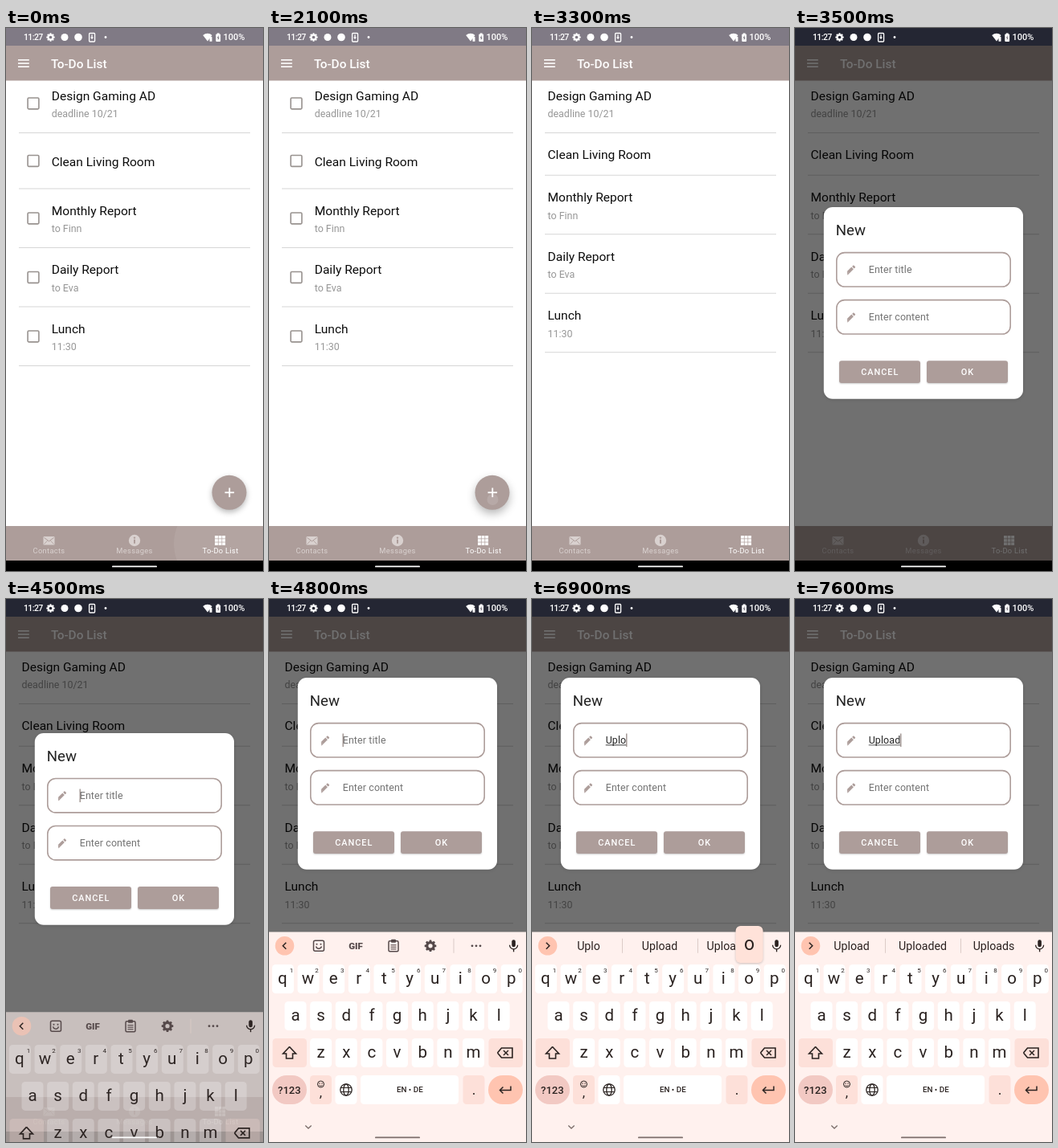
An HTML page with a canvas that plays this animation: 320 by 676 pixels, repeating every 8 s.

```html
<!DOCTYPE html>
<html lang="en">
<head>
<meta charset="utf-8">
<title>To-Do List</title>
<style>
html, body { margin: 0; width: 100%; height: 100%; overflow: hidden; background: #fff; }
canvas { display: block; width: 320px; height: 676px; }
</style>
</head>
<body>
<canvas id="stage"></canvas>
<script>
const W = 320, H = 676, LOOP = 8000, STEP = 100;
const BRAND = '#ad9d9a', INK = '#2a2220', PEACH = '#ffc4b0';
const canvas = document.getElementById('stage');
const dpr = window.devicePixelRatio || 1;
canvas.width = W * dpr;
canvas.height = H * dpr;
const c = canvas.getContext('2d');

const TASKS = [
  ['Design Gaming AD', 'deadline 10/21'],
  ['Clean Living Room'],
  ['Monthly Report', 'to Finn'],
  ['Daily Report', 'to Eva'],
  ['Lunch', '11:30']
];
// start time, typed text, suggestions
const TYPING = [
  [6000, 'U', 'U Und Us'],
  [6500, 'Up', 'Up Upload Update'],
  [6700, 'Upl', 'Upl Upload Uploaded'],
  [6900, 'Uplo', 'Uplo Upload Uploaded'],
  [7400, 'Uploa', 'Uploa Upload Uploaded'],
  [7600, 'Upload', 'Upload Uploaded Uploads']
];
const PRESSES = { 5900: 'u', 6400: 'p', 6900: 'o', 7300: 'a', 7500: 'd' };

const clamp = x => Math.max(0, Math.min(1, x));
const ramp = (t, from, to) => clamp((t - from) / (to - from));
const within = (t, from, to) => t >= from && t < to;

function box(x, y, w, h, r, fill, stroke, width) {
  c.beginPath();
  c.roundRect(x, y, w, h, r);
  if (fill) { c.fillStyle = fill; c.fill(); }
  if (stroke) { c.strokeStyle = stroke; c.lineWidth = width; c.stroke(); }
}

function disc(x, y, r, fill, stroke, width) {
  c.beginPath();
  c.arc(x, y, Math.max(0, r), 0, Math.PI * 2);
  if (fill) { c.fillStyle = fill; c.fill(); }
  if (stroke) { c.strokeStyle = stroke; c.lineWidth = width; c.stroke(); }
}

function path(points, color, width, filled) {
  c.beginPath();
  for (let i = 0; i < points.length; i += 2) c.lineTo(points[i], points[i + 1]);
  if (filled) { c.closePath(); c.fillStyle = color; c.fill(); }
  else { c.strokeStyle = color; c.lineWidth = width; c.stroke(); }
}

function text(str, x, y, size, color, { weight = 400, align = 'left', spacing = 0 } = {}) {
  c.font = `${weight} ${size}px Roboto, sans-serif`;
  c.letterSpacing = spacing + 'px';
  c.textAlign = align;
  c.fillStyle = color;
  c.fillText(str, x, y);
  return c.measureText(str).width;
}

function at(x, y, draw, scale = 1, angle = 0) {
  c.save();
  c.translate(x, y);
  c.rotate(angle);
  c.scale(scale, scale);
  draw();
  c.restore();
}

function shadow(color, blur, dy, draw) {
  c.save();
  c.shadowColor = color;
  c.shadowBlur = blur * dpr;
  c.shadowOffsetY = dy * dpr;
  draw();
  c.restore();
}

function gear(x, y, r, color) {
  disc(x, y, r * 0.58, null, color, r * 0.44);
  for (let i = 0; i < 8; i++) {
    at(x, y, () => box(r * 0.6, -r * 0.19, r * 0.4, r * 0.38, 0.5, color), 1, i * Math.PI / 4);
  }
}

function pencil(x, y, color) {
  at(x, y, () => {
    box(-4.8, -1.8, 7.8, 3.6, 0, color);
    box(4, -1.8, 2.6, 3.6, 0.8, color);
    path([-4.8, -1.8, -7.6, 1.8, -4.8, 1.8], color, 0, true);
  }, 1, -Math.PI / 4);
}

function plus(r, color, width) {
  path([-r, 0, r, 0], color, width);
  path([0, -r, 0, r], color, width);
}

function bin(color) {
  box(-4, -3, 8, 9, 1, color);
  box(-5, -5.5, 10, 1.6, 0, color);
}

function statusIcons() {
  const white = '#fff';
  text('11:27', 22, 15.2, 10.5, white, { weight: 500, spacing: -0.6 });
  gear(55.5, 11.5, 5.2, white);
  disc(73, 11.5, 4.5, white);
  disc(90, 11.5, 4.8, white);
  box(103.6, 6.5, 7, 10.5, 1, null, white, 1.3);
  path([107, 8.5, 107, 13], white, 1.3);
  path([105, 11.5, 109, 11.5, 107, 14], white, 0, true);
  disc(124, 11.5, 1.4, white);
  path([245.2, 9, 248, 7.3, 251, 6.8, 254, 7.3, 256.6, 9, 251, 16.5], white, 0, true);
  box(253.5, 11, 3, 5.8, 0.5, white);
  box(261.3, 7.5, 5.8, 9.5, 1, white);
  box(262.8, 6.4, 2.8, 1.5, 0, white);
  path([264.8, 9, 262.7, 12.6, 264, 12.6, 263.7, 15.3, 265.8, 11.8, 264.5, 11.8], '#77727c', 0, true);
  text('100%', 270.5, 15.3, 11, white, { weight: 500 });
}

function list(checkable) {
  const left = checkable ? 56.7 : 19.5;
  let top = 57;
  for (const [title, note] of TASKS) {
    const height = note ? 73.5 : checkable ? 69.5 : 52.7;
    text(title, left, note ? top + 32.8 : top + height / 2 + 6.3, 15.56, '#0c0c0c');
    if (note) text(note, left, top + 54.3, 12.45, '#979797');
    if (checkable) {
      const mid = top + height / 2 + 0.2;
      box(27.1, mid - 6.9, 13.8, 13.8, 1.3, null, '#98928f', 1.6);
    }
    top += height;
    box(16, top - 0.5, 288, 1, 0, '#d6d6d6');
  }
}

function navBar(ripple) {
  const dim = '#d9d1cf', white = '#fff';
  box(0, 620, W, 43, 0, BRAND);
  if (ripple) {
    c.save();
    c.beginPath();
    c.rect(0, 620, W, 43);
    c.clip();
    disc(267, 642, 58, `rgba(255,255,255,${ripple})`);
    c.restore();
  }
  box(46.5, 633, 14, 10.6, 1.2, dim);
  path([47.5, 634.5, 53.5, 639, 59.5, 634.5], BRAND, 1);
  path([47.5, 642.5, 51.5, 638.3], BRAND, 0.8);
  path([59.5, 642.5, 55.5, 638.3], BRAND, 0.8);
  disc(160, 638, 7.2, dim);
  box(159, 636.8, 2, 5, 0, BRAND);
  disc(160, 634.6, 1.2, BRAND);
  for (let i = 0; i < 9; i++) {
    box(260 + (i % 3) * 4.6, 632 + Math.floor(i / 3) * 4.2, 3.9, 3.5, 0, white);
  }
  [['Contacts', 53.5, dim], ['Messages', 160, dim], ['To-Do List', 267, white]].forEach(([label, x, color]) =>
    text(label, x, 654.2, 9.33, color, { align: 'center', spacing: 0.31 }));
}

function floatingButtons(t) {
  const icons = [() => plus(5, '#fff', 1.6), () => pencil(0, 0, '#fff'), () => bin('#fff')];
  icons.forEach((icon, i) => {
    const size = ramp(t, 2200 + (2 - i) * 80, 2500 + (2 - i) * 80);
    if (!size) return;
    at(278, 434 + i * 48.5, () => {
      shadow('rgba(0,0,0,.25)', 5, 2, () => disc(0, 0, 17, BRAND));
      if (i === 0 && t >= 3000) disc(0, 0, t < 3100 ? 10 : 17, 'rgba(255,255,255,.15)');
      icon();
    }, size);
  });
  const pressed = within(t, 2100, 2400);
  shadow('rgba(0,0,0,.28)', pressed ? 11 : 7, pressed ? 5 : 3, () => disc(278, 578.3, 21.5, BRAND));
  if (pressed) disc(278.5, 587, Math.min(20, 7 + (t - 2100) / 15), 'rgba(255,255,255,.13)');
  at(278.3, 578.3, () => plus(5.8, '#fff', 1.8), 1, ramp(t, 2200, 2600) * Math.PI / 4);
}

function field(y, hint, value) {
  box(51.8, y, 216.4, 42.4, 10, null, BRAND, 1.6);
  pencil(69.5, y + 21.4, BRAND);
  if (value) {
    const width = text(value, 91.7, y + 25.2, 12.45, '#262626', { spacing: 0.11 });
    box(91.7, y + 26.8, width, 0.9, 0, '#262626');
    return width;
  }
  text(hint, 91.7, y + 25.2, 12.45, '#747474', { spacing: 0.11 });
  return 0;
}

function dialog(y, typed, caret) {
  shadow('rgba(0,0,0,.12)', 4, 1, () => box(35.8, y, 248.2, 238.8, 11, '#fff'));
  text('New', 50.8, y + 35, 18.67, '#222');
  const width = field(y + 56.6, 'Enter title', typed);
  if (caret) box(91.6 + width, y + 69.5, 1.2, 16.5, 0, '#8e807d');
  field(y + 115.6, 'Enter content');
  [['CANCEL', 55], ['OK', 164]].forEach(([label, x]) => {
    shadow('rgba(0,0,0,.2)', 2, 1, () => box(x, y + 191.2, 101, 27.8, 3, BRAND));
    text(label, x + 50.8, y + 209.2, 10.9, '#fff', { weight: 500, align: 'center', spacing: 0.97 });
  });
}

function toolbar(y) {
  const icon = '#55494a';
  box(55.5, y - 6.5, 13, 13, 2, null, icon, 1.5);
  disc(59.5, y - 2, 1, icon);
  disc(64.5, y - 2, 1, icon);
  c.beginPath();
  c.arc(62, y, 3.5, 0.2, Math.PI - 0.2);
  c.stroke();
  text('GIF', 108, y + 4.2, 11.5, icon, { weight: 800, align: 'center' });
  box(149, y - 6, 12, 13, 1.5, null, icon, 1.5);
  box(152, y - 8, 6, 4, 1, icon);
  for (const dy of [-1, 1.5, 4]) path([151.5, y + dy, 158.5, y + dy], icon, 1.1);
  gear(201, y, 7.3, icon);
  box(229.5, y - 9, 1, 18, 0, '#d9c9c5');
  for (const x of [253, 258, 263]) disc(x, y, 1.4, icon);
}

function suggestions(y, words) {
  words.split(' ').forEach((word, i) =>
    text(word, [70.5, 159, 247.5][i], y + 5, 14.2, INK, { align: 'center' }));
  for (const x of [112, 206]) box(x, y - 9, 1, 18, 0, '#dccbc7');
}

function mic(y) {
  box(302.3, y - 7.5, 4.6, 9, 2.3, INK);
  c.beginPath();
  c.arc(304.6, y - 1, 5, 0, Math.PI);
  c.strokeStyle = INK;
  c.lineWidth = 1.3;
  c.stroke();
  path([304.6, y + 4, 304.6, y + 7.5], INK, 1.4);
}

function keyboard(top, fade, entry, upper, pressed) {
  const soft = '#fde0d9';
  const bar = top + 16.8, r1 = top + 58, r2 = top + 104, r3 = top + 150, r4 = top + 196;

  // Key caps fade in later than the panel, glyphs earlier.
  const glyphAlpha = clamp(fade * 1.6);
  const key = (x, y, w, fill, r = 4.5) => {
    c.globalAlpha = fade ** 3;
    box(x, y - 18, w, 36, r, fill);
    c.globalAlpha = glyphAlpha;
  };
  const row = (letters, x0, y, digits) => [...letters].forEach((letter, i) => {
    const x = x0 + i * 31.65;
    const label = upper ? letter.toUpperCase() : letter;
    key(x - 13.5, y, 27, '#fff');
    text(label, digits ? x - 0.6 : x, y + 6.3, 20.5, INK, { align: 'center' });
    if (digits) text((i + 1) % 10, x + 10.5, y - 8.3, 8, INK, { align: 'center' });
    if (letter === pressed) {
      const px = Math.min(x, 302);
      shadow('rgba(0,0,0,.2)', 3, 1, () => box(px - 17, y - 66, 34, 46, 6, '#ffe2d9'));
      text(label, px, y - 36, 23, INK, { align: 'center' });
    }
  });

  c.globalAlpha = fade;
  box(0, top - 0.6, W, H, 0, '#fff1ee');
  disc(19.5, bar, 11.8, PEACH);
  c.globalAlpha = glyphAlpha;
  const dir = entry ? 1 : -1;
  path([19.5 - 1.8 * dir, bar - 4, 19.5 + 2.2 * dir, bar, 19.5 - 1.8 * dir, bar + 4], INK, 1.5);
  if (entry) suggestions(bar, entry[2]);
  else toolbar(bar);
  mic(bar);

  key(4.5, r3, 42.5, soft);
  path([25.5, r3 - 7.5, 33.5, r3 + 1, 29.5, r3 + 1, 29.5, r3 + 7, 21.5, r3 + 7, 21.5, r3 + 1, 17.5, r3 + 1, 25.5, r3 - 7.5], INK, 1.6, upper);
  key(273.5, r3, 42.5, soft);
  path([284.5, r3, 289.5, r3 - 6, 303, r3 - 6, 303, r3 + 6, 289.5, r3 + 6, 284.5, r3], INK, 1.6);
  path([292, r3 - 3, 298, r3 + 3], INK, 1.5);
  path([298, r3 - 3, 292, r3 + 3], INK, 1.5);

  row('zxcvbnm', 64.6, r3);
  row('asdfghjkl', 33, r2);
  row('qwertyuiop', 17.4, r1, true);

  key(4, r4, 43, '#f2c9c3', 18);
  text('?123', 25.3, r4 + 4.7, 13, INK, { weight: 500, align: 'center' });
  key(51, r4, 27, soft);
  disc(64.5, r4 - 7, 4, null, INK, 1);
  disc(63, r4 - 8, 0.7, INK);
  disc(66, r4 - 8, 0.7, INK);
  path([62.5, r4 - 5.5, 64.5, r4 - 4.7, 66.5, r4 - 5.5], INK, 0.9);
  text(',', 64.5, r4 + 9, 17, INK, { align: 'center' });
  key(82.5, r4, 27, '#fff');
  disc(96, r4, 7.2, null, INK, 1.3);
  c.beginPath();
  c.ellipse(96, r4, 3.2, 7.2, 0, 0, Math.PI * 2);
  c.stroke();
  path([89.5, r4 - 2.6, 102.5, r4 - 2.6], INK, 1.1);
  path([89.5, r4 + 2.6, 102.5, r4 + 2.6], INK, 1.1);
  key(114, r4, 122, '#fff');
  text('EN • DE', 175.3, r4 + 3.3, 9.8, INK, { weight: 500, align: 'center' });
  key(241.5, r4, 27, soft);
  text('.', 255, r4 + 6, 18, INK, { align: 'center' });
  key(273, r4, 43, PEACH, 18);
  path([301, r4 - 4.5, 301, r4 + 0.5, 288, r4 + 0.5], INK, 1.5);
  path([291.5, r4 - 3.5, 287.5, r4 + 0.5, 291.5, r4 + 4.5], INK, 1.5);
  path([45.3, top + 240.5, 49, top + 244, 52.7, top + 240.5], '#7b6d6a', 1.3);
}

function draw(t) {
  const shown = ramp(t, 3300, 3500);
  const slide = ramp(t, 4400, 4765);
  const entry = TYPING.filter(([start]) => t >= start).pop();

  c.setTransform(dpr, 0, 0, dpr, 0, 0);
  c.globalAlpha = 1;
  box(0, 0, W, H, 0, '#fff');
  list(t < 3300);
  box(0, 22, W, 43.5, 0, BRAND);
  for (const y of [39.8, 44, 48.2]) box(15, y - 0.8, 13.8, 1.6, 0, '#fff');
  text('To-Do List', 56, 49.6, 15.4, '#fff', { weight: 500 });
  navBar(t < 300 ? 0.07 : t < 400 ? 0.03 : 0);
  if (t < 3300) floatingButtons(t);

  box(0, 0, W, 22, 0, '#807a85');
  if (shown) {
    box(0, 0, W, H, 0, `rgba(0,0,0,${0.56 * shown})`);
    box(0, 0, W, 22, 0, `rgba(30,34,48,${0.75 * shown})`);
  }
  statusIcons();
  box(0, 663, W, 13, 0, '#000');

  if (shown) {
    const y = 223 - 125 * (1 - Math.pow(1 - slide, 1.86));
    const caret = slide > 0 && !within(t, 5100, 5600);
    c.globalAlpha = shown;
    at(160, y + 119.5, () => {
      c.translate(-160, -y - 119.5);
      dialog(y, entry && entry[1], caret);
    }, 0.9 + 0.1 * shown);
  }
  if (slide) {
    keyboard(415 + 261 * Math.pow(1 - slide, 3), clamp(slide * 2.25), entry, within(t, 5700, 6000), PRESSES[t]);
  }
  c.globalAlpha = 1;
  box(132, 669.6, 56, 1.7, 0.85, slide === 1 ? '#7b6d6a' : '#fff');
}

const start = performance.now();
function tick() {
  const elapsed = (performance.now() - start) % LOOP;
  draw(Math.floor(elapsed / STEP) * STEP);
  requestAnimationFrame(tick);
}
tick();
</script>
</body>
</html>
```
